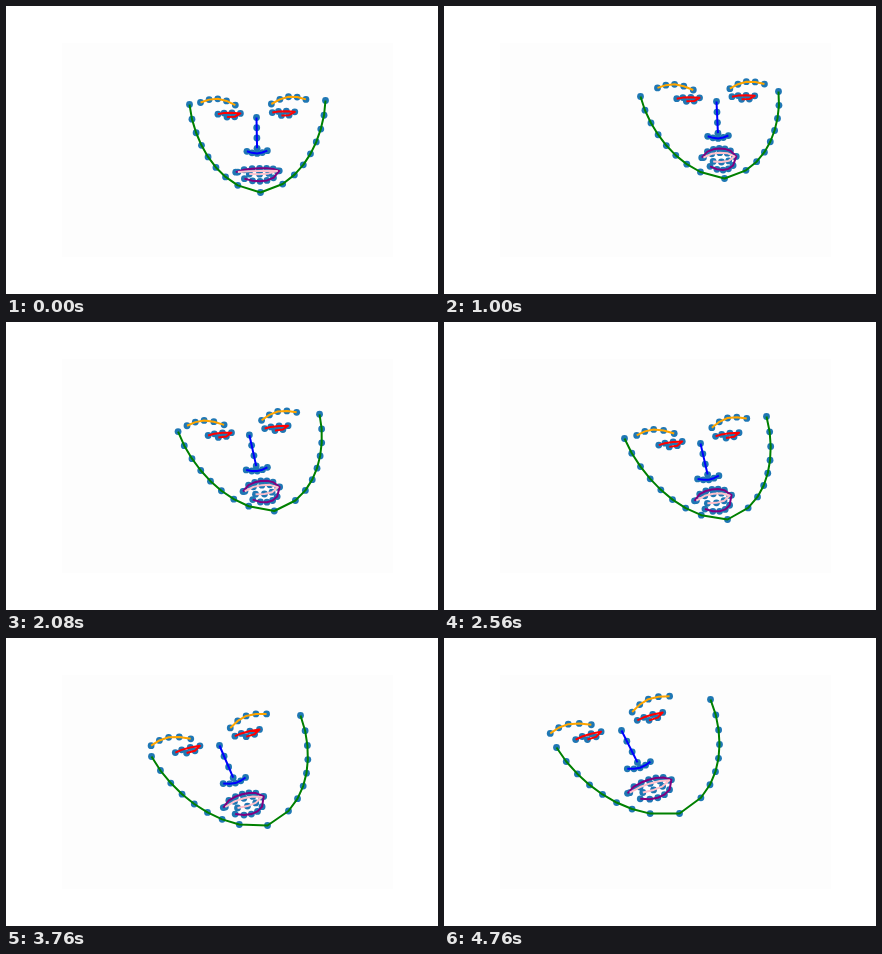
An HTML page with a canvas for the animation above (4.8 s loop, 432 by 288 pixels).

```html
<!DOCTYPE html>
<html lang="en">
<head>
<meta charset="utf-8">
<title>Face landmarks</title>
<style>
html, body { margin: 0; width: 100%; height: 100%; overflow: hidden; background: #fff; }
canvas { display: block; }
</style>
</head>
<body>
<canvas id="stage" width="432" height="288"></canvas>
<script>
const ctx = document.getElementById('stage').getContext('2d');
const LOOP = 4800, STEP = 40;

// Key points of the head; drift is the detour on the way to the next pose.
const poses = [
  { at: 0, earL: [183, 98], earR: [319, 94], chin: [254, 186], nose: [250, 111], mouth: [251, 165], open: 0, drift: [2.5, -3] },
  { at: 1000, earL: [196, 90], earR: [334, 85], chin: [280, 172], nose: [272, 95], mouth: [274.5, 150.5], open: 1, drift: [11, -15] },
  { at: 1640, earL: [181, 97], earR: [322, 84], chin: [271, 175], nose: [248, 99], mouth: [259.5, 153], open: 0.9, drift: [-9, 3] },
  { at: 2560, earL: [180, 116], earR: [322, 94], chin: [283, 197], nose: [256, 121], mouth: [268.5, 175.5], open: 0.85, drift: [7, -4] },
  { at: 3120, earL: [172, 114], earR: [319, 86], chin: [280, 190], nose: [244, 115], mouth: [262.5, 168], open: 0.8, drift: [-6, -4] },
  { at: 3760, earL: [145, 118], earR: [294, 77], chin: [261, 187], nose: [213, 107], mouth: [237, 163.5], open: 0.7, drift: [-3, 2] },
  { at: 4760, earL: [112, 109], earR: [266, 61], chin: [235, 175], nose: [177, 92], mouth: [205, 148], open: 0.5, drift: [0, 0] }
];

const lerp = (a, b, k) => a + (b - a) * k;
const mix = (p, q, k) => [lerp(p[0], q[0], k), lerp(p[1], q[1], k)];
const minus = (p, q) => [p[0] - q[0], p[1] - q[1]];
const list = (n, make) => Array.from({ length: n }, (_, i) => make(i));

// Coordinates measured along two axes that lean with the head.
const frame = (origin, u, v) => (a, b) =>
  [origin[0] + a * u[0] + b * v[0], origin[1] + a * u[1] + b * v[1]];

function headAt(t) {
  let i = 0;
  while (i < poses.length - 2 && t >= poses[i + 1].at) i++;
  const from = poses[i], to = poses[i + 1];
  const k = (t - from.at) / (to.at - from.at);
  const detour = Math.sin(Math.PI * k) ** 2;
  const shift = frame([0.5, 0.5], from.drift, [0, 0])(detour, 0);
  const head = { open: lerp(from.open, to.open, k) };
  for (const name of ['earL', 'earR', 'chin', 'nose', 'mouth']) {
    const [x, y] = mix(from[name], to[name], k);
    head[name] = [x + shift[0], y + shift[1]];
  }
  return head;
}

function jawLine(place) {
  return list(17, i => {
    const s = 1 - Math.abs(i - 8) / 8;
    const width = (1 - s ** 1.5) ** 0.65;
    return place(Math.sign(i - 8) * width, s * (1.35 - 0.35 * s));
  });
}

function brow(place, side) {
  return list(5, i => {
    const t = side < 0 ? 1 - i / 4 : i / 4;
    return place(-0.04 + side * (0.265 + 0.51 * t), -0.145 - 0.04 * t - 0.055 * Math.sin(Math.PI * t));
  });
}

function eye(place, side) {
  const corner = [-1, -0.45, 0.25, 1, 0.48, -0.2];
  return corner.map((x, i) => {
    const lid = i % 3 === 0 ? 0 : i < 3 ? -0.01 : 0.035;
    return place(side * 0.4 + x * 0.165, lid - 0.05);
  });
}

// Runs along the upper edge to the right corner and back below.
function mouthRing(place, count, width, top, bottom) {
  const half = count / 2;
  return list(count, i => {
    const x = 1 - 2 * Math.abs(i - half) / half;
    const round = 1 - x * x;
    return place(width * (x + 0.1 * round), (i < half ? -top : bottom) * round ** 0.65);
  });
}

function faceParts({ earL, earR, chin, nose, mouth, open }) {
  const middle = mix(earL, earR, 0.5);
  const across = minus(earR, middle), down = minus(chin, middle);
  const face = frame(nose, across, down);
  const noseFrame = frame(nose, across, minus(mouth, nose));
  const lipFrame = frame(mouth, across, down);
  const lipWidth = 0.32 - 0.07 * open;
  return [
    ['green', jawLine(frame(middle, across, down))],
    ['orange', brow(face, -1)],
    ['orange', brow(face, 1)],
    ['blue', list(4, i => noseFrame(0, i * 0.19))],
    ['blue', list(5, i => noseFrame((i - 2) * 0.075, 0.62 + 0.045 * Math.sin(Math.PI * i / 4)))],
    ['red', eye(face, -1)],
    ['red', eye(face, 1)],
    ['purple', mouthRing(lipFrame, 12, lipWidth, 0.035 + 0.065 * open, 0.11 + 0.045 * open)],
    ['pink', mouthRing(lipFrame, 8, lipWidth * 0.9, 0.005 + 0.045 * open, 0.03 + 0.03 * open)]
  ];
}

function draw(t) {
  const parts = faceParts(headAt(t));
  ctx.fillStyle = '#fff';
  ctx.fillRect(0, 0, 432, 288);
  ctx.fillStyle = '#fdfdfd';
  ctx.fillRect(56, 37, 331, 214);

  ctx.fillStyle = '#1f77b4';
  for (const [, points] of parts) {
    for (const [x, y] of points) {
      ctx.beginPath();
      ctx.arc(x, y, 3.4, 0, Math.PI * 2);
      ctx.fill();
    }
  }
  ctx.lineWidth = 2;
  ctx.lineJoin = 'round';
  for (const [color, points] of parts) {
    ctx.strokeStyle = color;
    ctx.beginPath();
    points.forEach(([x, y]) => ctx.lineTo(x, y));
    ctx.stroke();
  }
}

const start = performance.now();
function tick() {
  const t = (performance.now() - start) % LOOP;
  draw(Math.floor(t / STEP) * STEP);
  requestAnimationFrame(tick);
}
tick();
</script>
</body>
</html>
```
